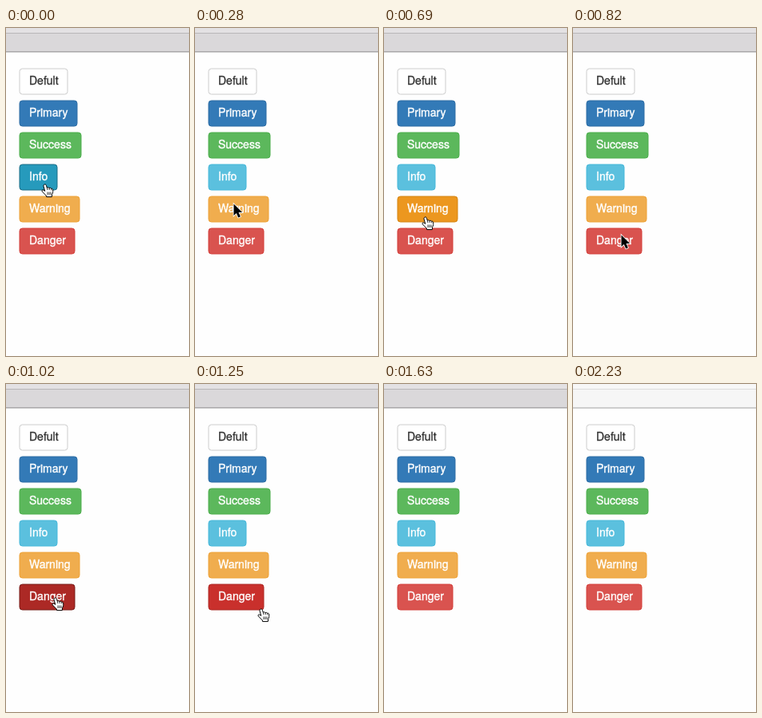
An HTML page that plays this animation: 229x411 px, repeating every 2280 ms.

```html
<!DOCTYPE html>
<html lang="en">
<head>
<meta charset="utf-8">
<title>Buttons</title>
<style>
  html, body { margin: 0; width: 100%; height: 100%; overflow: hidden; background: #fefefe; }
  #bar { position: absolute; inset: 0 0 auto; height: 29px; background: #dad8da; border-bottom: 1px solid #a9a7a9; box-shadow: 0 1px #d1d0d1; }
  #bar::before { content: ""; display: block; height: 6px; background: #e3e1e3; border-bottom: 1px solid #b9b7b9; }
  #bar.light { background: #f6f6f6; border-color: #cacaca; }
  #bar.light::before { background: #f7f7f7; border-color: #dcdcdc; }
  svg { position: absolute; left: 0; top: 0; width: 100%; height: 100%; }
  text { font: 14px "Helvetica Neue", "Liberation Sans", Arial, sans-serif; stroke-width: .35px; }
</style>
</head>
<body>
<div id="bar"></div>
<svg>
  <g id="buttons"></g>
  <path id="arrow" d="M0 0V14.6L3.3 11.6L5.7 17L8.4 15.8L6 10.6H10.6Z" fill="#000" stroke="#fff" stroke-width="1.6" paint-order="stroke"/>
  <g id="hand" fill="#fff" stroke="#000" stroke-linejoin="round">
    <path d="M3.6 1.4C4.7.4 6 1 6.4 2.3L7.3 5.2C8.2 4.5 9.6 4.7 10 5.7C10.9 5 12.2 5.3 12.6 6.3C13.6 5.9 14.6 6.6 14.7 7.8C14.8 10 14.8 11.5 13.6 13.4L13.3 16.6H6.6L6.3 15C4.6 13.4 3 11.6 1.4 10C.4 8.9 1.2 7.6 2.6 8C3.5 8.3 4 8.8 4.7 9.4L3 3.2C2.8 2.5 3 1.8 3.6 1.4Z"/>
    <path d="M7.3 5.2L8 8M10 5.7L10.4 8M12.6 6.3L12.8 8.4M8 10.5V14M10 10.5V14M12 10.5V14" stroke-width=".8"/>
  </g>
</svg>
<script>
const LOOP = 2280;
const $ = id => document.getElementById(id);

function add(parent, tag, attrs) {
  const el = document.createElementNS('http://www.w3.org/2000/svg', tag);
  for (const key in attrs) el.setAttribute(key, attrs[key]);
  return parent.appendChild(el);
}

// label, width, then [fill, border] for rest, hover, down
const specs = [
  ['Defult', 62, ['#fff', '#ccc']],
  ['Primary', 74, ['#337ab7', '#2e6da4']],
  ['Success', 79, ['#5cb85c', '#4cae4c']],
  ['Info', 49, ['#5bc0de', '#46b8da'], ['#31b0d5', '#269abc'], ['#269abc', '#1b6d85']],
  ['Warning', 77, ['#f0ad4e', '#eea236'], ['#ec971f', '#d58512'], ['#d58512', '#985f0d']],
  ['Danger', 71, ['#d9534f', '#d43f3a'], ['#c9302c', '#ac2925'], ['#ac2925', '#761c19']]
];
const buttons = specs.map(([label, width, ...looks], i) => {
  const y = 50 + i * 40;
  const ink = i ? '#fff' : '#333';
  const box = add($('buttons'), 'rect', { x: 17, y: y + 1, width: width - 2, height: 32, rx: 3.5 });
  add($('buttons'), 'text', { x: 29, y: y + 21, fill: ink, stroke: ink }).textContent = label;
  return { box, looks };
});

// time, button under the pointer, look
const states = [
  [0, 3, 2], [30, 3, 1], [228, -1, 0], [310, 4, 1], [520, 4, 2], [630, 4, 1],
  [760, -1, 0], [850, 5, 1], [1020, 5, 2], [1110, 5, 1], [1270, -1, 0]
];
// time, pointer shape
const shapes = [[0, 'hand'], [255, 'arrow'], [310, 'hand'], [760, 'arrow'], [850, 'hand'], [1270, 'arrow'], [1630, '']];
// quadratic paths, sampled in n ticks; k sets the ease-out
const moves = [
  { at: 200, tick0: 200, step: 27.5, n: 5, k: 1.3, x: [48, 48, 48], y: [196, 213, 231] },
  { at: 670, tick0: 670, step: 30, n: 10, k: 1.55, x: [48, 60.4, 61], y: [231, 249.5, 268] },
  { at: 1250, tick0: 1240, step: 30, n: 14, k: 1.7, x: [61, 154, 189], y: [268, 325, 410] }
];

const last = (rows, t) => rows.filter(r => r[0] <= t).pop();
const bezier = ([a, b, c], e) => a * (1 - e) ** 2 + 2 * b * e * (1 - e) + c * e * e;

function pointer(t) {
  const m = moves.filter(m => m.at <= t).pop();
  if (!m) return [moves[0].x[0], moves[0].y[0]];
  const p = Math.min(1, (Math.floor((t - m.tick0) / m.step) + 1) / m.n);
  const e = 1 - (1 - p) ** m.k;
  return [bezier(m.x, e), bezier(m.y, e)].map(Math.round);
}

function draw(t) {
  const [, hot, look] = last(states, t);
  buttons.forEach(({ box, looks }, i) => {
    const [fill, border] = looks[i === hot ? look : 0];
    box.setAttribute('fill', fill);
    box.setAttribute('stroke', border);
  });
  const shape = last(shapes, t)[1];
  const [x, y] = pointer(t);
  $('hand').setAttribute('transform', `translate(${x - 4} ${y - 1})`);
  $('arrow').setAttribute('transform', `translate(${x + .5} ${y + .5})`);
  for (const id of ['hand', 'arrow']) $(id).style.display = id === shape ? 'inline' : 'none';
  $('bar').classList.toggle('light', t >= 2230);
}

const start = performance.now();
function frame() {
  draw((performance.now() - start) % LOOP);
  requestAnimationFrame(frame);
}
frame();
</script>
</body>
</html>
```
